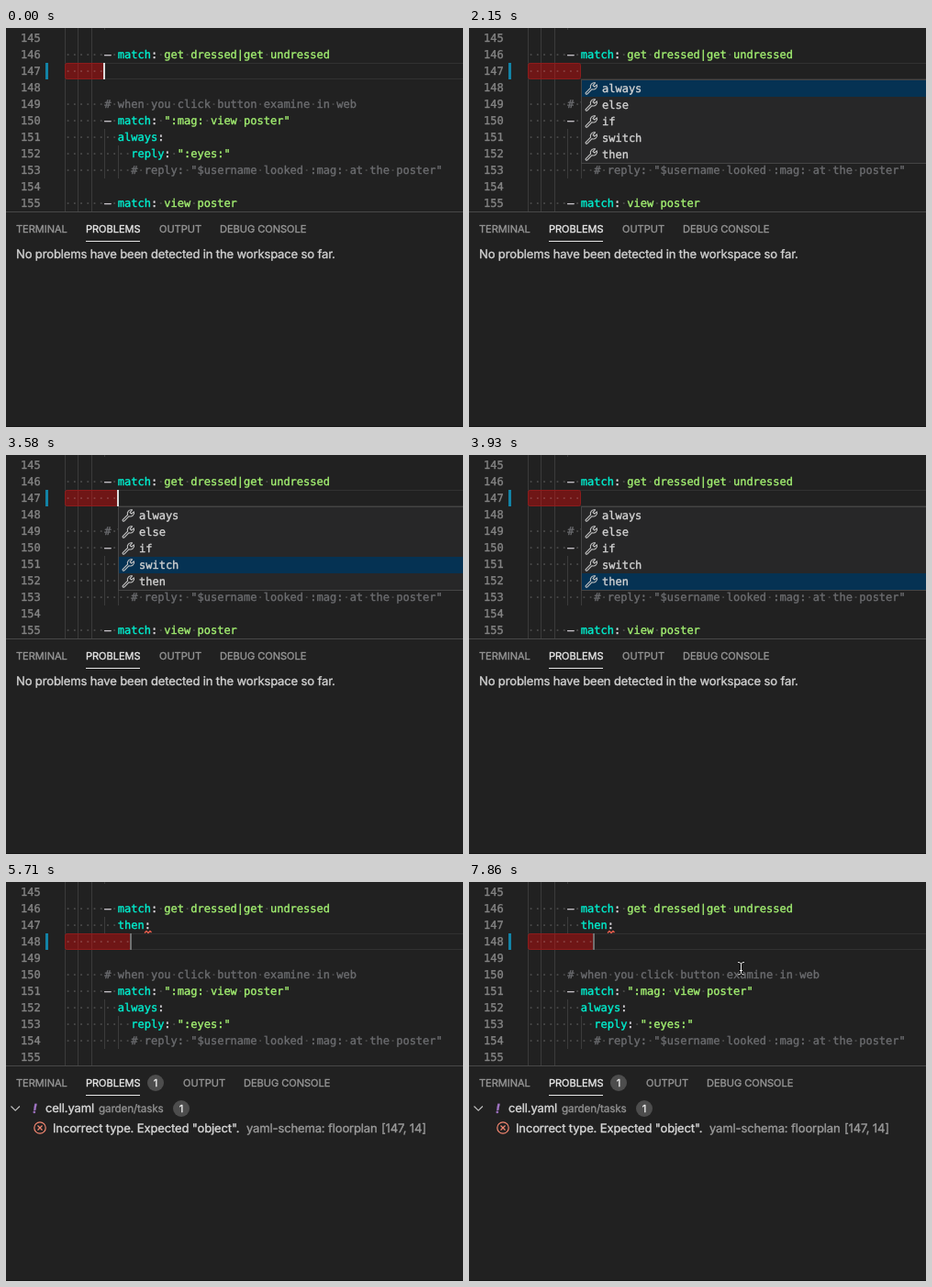
An HTML page with a canvas that plays this animation: 498 by 435 pixels, repeating every 8 s.

```html
<!DOCTYPE html>
<html lang="en">
<head>
<meta charset="utf-8">
<style>
  html, body { margin: 0; width: 100%; height: 100%; overflow: hidden; background: #212121; }
  canvas { display: block; }
</style>
</head>
<body>
<canvas id="stage" width="498" height="435"></canvas>
<script>
const ctx = document.getElementById('stage').getContext('2d');
const LOOP = 8000, ROW = 18, TOP = 2, LEFT = 64, CHAR = 7.224;
const BG = '#212121', PLAIN = '#dcd8de', KEY = '#00f0d0', STRING = '#a4f272', COMMENT = '#6c6d70';
const MONO = '12px "DejaVu Sans Mono", monospace';
const blinks = [720, 1440, 1790, 2510, 2870, 3220, 3930, 4290, 5000, 5710, 6430, 6780, 7500, 7860];
const options = ['always', 'else', 'if', 'switch', 'then'];
const head = ['', '      – match: get dressed|get undressed'];
const tail = [
  '',
  '      # when you click button examine in web',
  '      – match: ":mag: view poster"',
  '        always:',
  '          reply: ":eyes:"',
  '          # reply: "$username looked :mag: at the poster"',
  '',
  '      – match: view poster'
];
const wrench = new Path2D('M1.9 12.6L7.3 7.2A4 4 0 0 1 12.2 1.9L9.8 4.6L11.4 6.2L14.1 3.8A4 4 0 0 1 8.8 8.7L3.4 14.1A1.1 1.1 0 0 1 1.9 12.6Z');
const hand = new Path2D('M457.2 281.5V275.2a1.4 1.4 0 0 1 2.8 0v3.4l1.2-.4l1.3.9l1.3-.4l1.2 1l1.2-.2l1.4 1.2V283l-1.4 3v2h-6.4v-1.6l-4-4.6q-.5-1.8 1.4-1.3z');
const fingers = new Path2D('M461.4 282v3m2-3v3m2-3v3');
const beam = new Path2D('M293 87.5q3 0 3.5 1.5q.5-1.5 3.5-1.5M296.5 89v10.5M293 101q3 0 3.5-1.5q.5 1.5 3.5 1.5M295 96.5h3');

const colX = col => LEFT + col * CHAR;

function rect(x, y, w, h, color) {
  ctx.fillStyle = color;
  ctx.fillRect(x, y, w, h);
}

function stroke(path, color, width = 1) {
  ctx.strokeStyle = color;
  ctx.lineWidth = width;
  ctx.stroke(path);
}

function circle(x, y, r) {
  const path = new Path2D();
  path.arc(x, y, r, 0, Math.PI * 2);
  return path;
}

// Text with a hairline outline, for slightly heavier strokes.
function ink(text, x, y, color) {
  ctx.fillStyle = ctx.strokeStyle = color;
  ctx.lineWidth = 0.35;
  ctx.fillText(text, x, y);
  ctx.strokeText(text, x, y);
}

function label(text, x, y, color, size = 13, spacing = -0.13, style = '') {
  ctx.font = `${style} ${size}px Inter, sans-serif`;
  ctx.letterSpacing = spacing + 'px';
  ink(text, x, y, color);
}

// Monospaced text on the editor grid; spaces show as dots when asked.
function mono(text, x, top, color, dots = false) {
  ctx.font = MONO;
  ctx.letterSpacing = '0px';
  [...text].forEach((char, i) => {
    const cx = x + i * CHAR;
    if (char !== ' ') ink(char, cx, top + 13, color);
    else if (dots) rect(cx + 2.7, top + 8.2, 1.8, 1.8, 'rgba(230,230,230,.2)');
  });
}

function codeLine(line, top) {
  const [, indent, dash = '', comment = '', key = '', colon = '', value = ''] =
    line.match(/^( *)(– )?(?:(#.*)|(\w+)(:)(.*))?$/);
  let col = 0;
  const parts = [[indent + dash, PLAIN], [comment, COMMENT], [key, KEY], [colon, PLAIN], [value, STRING]];
  for (const [text, color] of parts) {
    mono(text, colX(col), top, color, true);
    col += text.length;
  }
}

function guides(line, top) {
  const depth = line.trim() ? line.search(/\S/) : 6;
  for (let col = 0; col < depth; col += 2) rect(Math.round(colX(col)), top, 1, ROW, '#3b3b3b');
}

function editor(t, accepted) {
  const indent = t < 360 ? 6 : !accepted ? 8 : t < 5350 ? 12 : 10;
  const lines = [...head, ...(accepted ? ['        then:'] : []), ' '.repeat(indent), ...tail].slice(0, 11);
  const active = accepted ? 3 : 2, top = TOP + active * ROW;
  const caretX = Math.round(colX(indent)) - 1;

  guides('        x', TOP - ROW);
  lines.forEach((line, i) => guides(line, TOP + i * ROW));
  rect(64, top, 434, 1, '#313131');
  rect(64, top + ROW - 1, 434, 1, '#313131');
  rect(43, top, 3, ROW, '#1283a6');

  const box = new Path2D();
  box.roundRect(64.5, top + 0.5, caretX - 64, ROW - 1, 2);
  ctx.fillStyle = 'rgba(255,0,0,.35)';
  ctx.fill(box);
  stroke(box, '#8c1c1c');

  lines.forEach((line, i) => {
    mono(String(145 + i), 16, TOP + i * ROW, '#858585');
    codeLine(line, TOP + i * ROW);
  });

  if (t >= 4640) stroke(new Path2D('M151 55.5l2-2l2 2l2-2l1.5 1.5'), '#f4604f', 1.3);
  if (blinks.filter(b => b <= t).length % 2 === 0)
    rect(caretX, top, 2, ROW, t >= 5710 ? '#707070' : '#dcdcdc');
}

function suggestions(selected) {
  rect(122, 56, 376, 92, '#454545');
  rect(123, 57, 375, 90, '#272728');
  options.forEach((name, i) => {
    const top = 57 + i * ROW;
    if (i === selected) rect(123, top, 375, ROW, '#053253');
    ctx.save();
    ctx.translate(125.3, top + 1);
    stroke(wrench, '#c5c5c5', 1.1);
    ctx.restore();
    mono(name, 145, top, '#d4d4d4');
  });
}

function badge(x, y, r) {
  ctx.fillStyle = '#4d4d4d';
  ctx.fill(circle(x, y, r));
  ctx.textAlign = 'center';
  label('1', x, y + 4, '#f0f0f0', 11, 0);
  ctx.textAlign = 'left';
}

function panel(t) {
  const found = t >= 4640, hover = t >= 7140 && t < 7500;
  rect(0, 200, 498, 235, BG);
  rect(0, 200, 498, 1, '#484848');
  rect(0, 434, 498, 1, '#151515');
  const shift = found ? 26 : 0;
  const tabs = [['TERMINAL', 11], ['PROBLEMS', 87], ['OUTPUT', 167 + shift], ['DEBUG CONSOLE', 233 + shift]];
  tabs.forEach(([name, x], i) => label(name, x, 223, i === 1 ? '#e7e7e7' : '#969696', 11, 0));
  rect(87, 232, 59, 1, '#e7e7e7');

  if (!found) {
    label('No problems have been detected in the workspace so far.', 11, 251, '#d2d2d2');
    return;
  }
  if (hover) {
    rect(0, 235.5, 498, 22, '#2a2d2e');
    rect(7, 258, 1, 21, '#484848');
  }
  badge(163, 219, 9);
  stroke(new Path2D('M5.5 244.5l4.7 4.7l4.7-4.7'), '#c5c5c5', 1.1);
  label('!', 29, 251.5, '#a074c4', 14, 0, 'italic bold');
  label('cell.yaml', 43, 251, '#d8d8d8');
  label('garden/tasks', 101, 251, '#919191', 11.7);
  badge(191, 247, 9);

  stroke(circle(37, 268, 6.2), '#f48771', 1.2);
  stroke(new Path2D('M34.5 265.5l5 5m0-5l-5 5'), '#f48771', 1.2);
  label('Incorrect type. Expected "object".', 51, 273, '#d8d8d8');
  label('yaml-schema: floorplan', 262, 273, '#9b9b9b');
  label('[147, 14]', 409, 273, '#9b9b9b');
}

function pointer(t) {
  if (t < 7140) return;
  if (t < 7500) {
    stroke(hand, '#111', 2);
    ctx.fillStyle = '#fff';
    ctx.fill(hand);
    stroke(fingers, '#333', 0.7);
  } else {
    stroke(beam, '#111', 3);
    stroke(beam, '#f2f2f2', 1);
  }
}

function draw() {
  const t = performance.now() % LOOP, accepted = t >= 4290;
  ctx.textRendering = 'geometricPrecision';
  ctx.lineJoin = 'round';
  rect(0, 0, 498, 435, BG);
  editor(t, accepted);
  if (t >= 2150 && !accepted) suggestions(t < 3580 ? 0 : t < 3930 ? 3 : 4);
  panel(t);
  pointer(t);
  requestAnimationFrame(draw);
}
draw();
</script>
</body>
</html>
```
